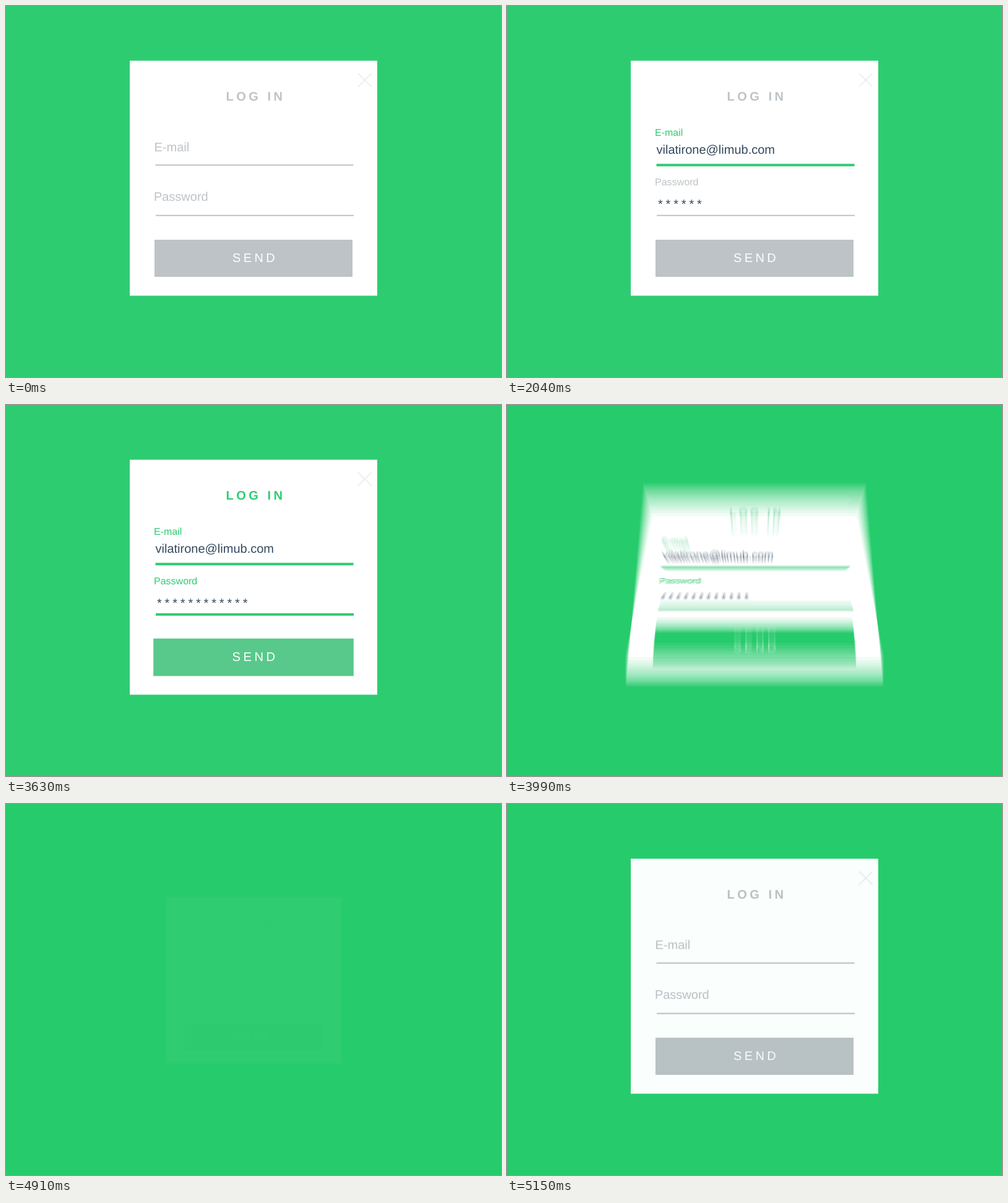
Write an HTML page that moves like this. It is 800x600 px and loops after 5.18 s.

```html
<!DOCTYPE html>
<html lang="en">
<head>
<meta charset="utf-8">
<title>Log in form</title>
<style>
  html, body { margin: 0; width: 100%; height: 100%; overflow: hidden; background: #2ecc71; }
  .layer {
    position: absolute; left: 0; top: 0; width: 800px; height: 600px;
    overflow: hidden; background: #2ecc71;
    perspective: 1111px; perspective-origin: 400px 300px;
  }
  svg {
    position: absolute; left: 0; top: 0; overflow: visible;
    transform-origin: 400px 278.5px;
    font: 20px "Liberation Sans", Arial, sans-serif;
    text-rendering: geometricPrecision;
  }
  text { white-space: pre; }
</style>
</head>
<body>
<template id="form">
  <div class="layer">
    <svg width="800" height="600" viewBox="0 0 800 600">
      <rect x="200" y="88.5" width="400" height="380" fill="#fff"/>
      <path d="M569 109l21.5 21.5M590.5 109l-21.5 21.5" stroke="#ecf0f1" stroke-width="2"/>
      <text class="title" x="355.6" y="153.3" font-weight="bold" letter-spacing="4.5">LOG IN</text>
      <text class="mailLabel">E-mail</text>
      <text class="mail" x="241.5" y="239" fill="#34495e"></text>
      <path class="mailLine" d="M241.5 257.2h320"/>
      <text class="passLabel">Password</text>
      <text class="pass" x="244" y="327" fill="#34495e" letter-spacing="4.82"></text>
      <path class="passLine" d="M242 338.8h320"/>
      <g class="button">
        <rect class="face" x="240" y="378" width="320" height="60"/>
        <text x="366" y="413.8" fill="#fff" letter-spacing="4.4">SEND</text>
      </g>
    </svg>
  </div>
</template>
<script>
const LOOP = 5180, STEP = 30, SHUTTER = 15, SAMPLES = 16, DEPTH = 1111;
const GREY = [189, 195, 199], GREEN = [46, 204, 113];
const EMAIL = 'vilatirone@limub.com', STARS = '*'.repeat(12);
const PARTS = ['title', 'mailLabel', 'mail', 'mailLine', 'passLabel', 'pass', 'passLine', 'button', 'face'];

const progress = (t, from, to) => Math.min(1, Math.max(0, (t - from) / (to - from)));
const smooth = (t, from, to) => { const x = progress(t, from, to); return x * x * (3 - 2 * x); };
const steep = x => x < .5 ? 64 * x ** 7 : 1 - 64 * (1 - x) ** 7;
const lerp = (a, b, k) => a + (b - a) * k;
const tint = k => `rgb(${GREY.map((c, i) => Math.round(lerp(c, GREEN[i], k)))})`;

const layers = Array.from({ length: SAMPLES }, (_, i) => {
  const layer = document.getElementById('form').content.firstElementChild.cloneNode(true);
  // Stacked weights 1, 1/2, 1/3 ... give the plain average of all samples.
  layer.style.opacity = 1 / (i + 1);
  document.body.append(layer);
  const parts = { layer, card: layer.querySelector('svg') };
  for (const name of PARTS) parts[name] = layer.querySelector('.' + name);
  return parts;
});

function setLabel(label, k, color, from, to) {
  const [x, y] = from.map((v, i) => lerp(v, to[i], k));
  label.setAttribute('transform', `translate(${x} ${y}) scale(${lerp(1, .8, k)})`);
  label.setAttribute('fill', tint(color));
}

function setLine(line, k) {
  line.setAttribute('stroke', tint(k));
  line.setAttribute('stroke-width', lerp(2, 4, k));
}

const typed = (text, t, from) => text.slice(0, Math.floor(progress(t, from, from + 600) * text.length));

function fillForm(p, t) {
  const mailColor = smooth(t, 555, 1185), passColor = smooth(t, 2055, 2805);
  p.title.setAttribute('fill', tint(passColor));

  setLabel(p.mailLabel, smooth(t, 10, 570), mailColor, [239.5, 234.5], [239, 210]);
  p.mail.textContent = typed(EMAIL, t, 240);
  setLine(p.mailLine, mailColor);

  setLabel(p.passLabel, smooth(t, 1510, 2070), passColor, [238.9, 315.4], [239, 289.8]);
  p.pass.textContent = typed(STARS, t, 1740);
  setLine(p.passLine, passColor);

  const press = progress(t, 3285, 3825);
  const size = 1 + .0125 * Math.sin(Math.PI * press);
  p.face.setAttribute('fill', tint(smooth(t, 3285, 3825)));
  p.button.setAttribute('transform', `translate(400 408) scale(${size}) translate(-400 -408)`);
}

function placeCard(card, t) {
  let away = 0, turn = 0, rise = 0, opacity = 1;
  if (t > 4600) {
    away = 1 / (1 - .3 * (1 - progress(t, 4910, 5150)) ** 2) - 1;
    opacity = smooth(t, 4870, 5168);
  } else if (t > 3825) {
    const k = steep(progress(t, 3840, 4218));
    away = k ** 1.25;
    turn = 360 * k;
    if (t < 4348) rise = Math.max(0, 1487 / (4348.5 - t) - 13.3);
    else opacity = 0;
  }
  card.style.opacity = opacity;
  card.style.transform = away || turn
    ? `translate3d(0, ${-rise * (1 + away)}px, ${-DEPTH * away}px) rotateX(${turn}deg)`
    : 'none';
}

function draw(t) {
  const blurred = (t >= 3840 && t < 4380) || t >= 4910;
  const hidden = t >= 4380 && t < 4910;
  layers.forEach((p, i) => {
    const used = blurred || i === 0;
    p.layer.style.display = used ? '' : 'none';
    if (!used) return;
    p.card.style.visibility = hidden ? 'hidden' : '';
    fillForm(p, t < 4600 ? t : 0);
    placeCard(p.card, blurred ? t + SHUTTER * ((i + .5) / SAMPLES - .5) : t);
  });
}

// The picture holds for 30 ms; the grid shifts by 20 ms after the empty pause.
function stepTime(t) {
  const shift = t >= 4910 ? 20 : 0;
  return Math.floor((t - shift) / STEP) * STEP + shift;
}

const start = performance.now();
let shown = -1;
function tick() {
  const t = stepTime((performance.now() - start) % LOOP);
  if (t !== shown) draw(shown = t);
  requestAnimationFrame(tick);
}
tick();
</script>
</body>
</html>
```
